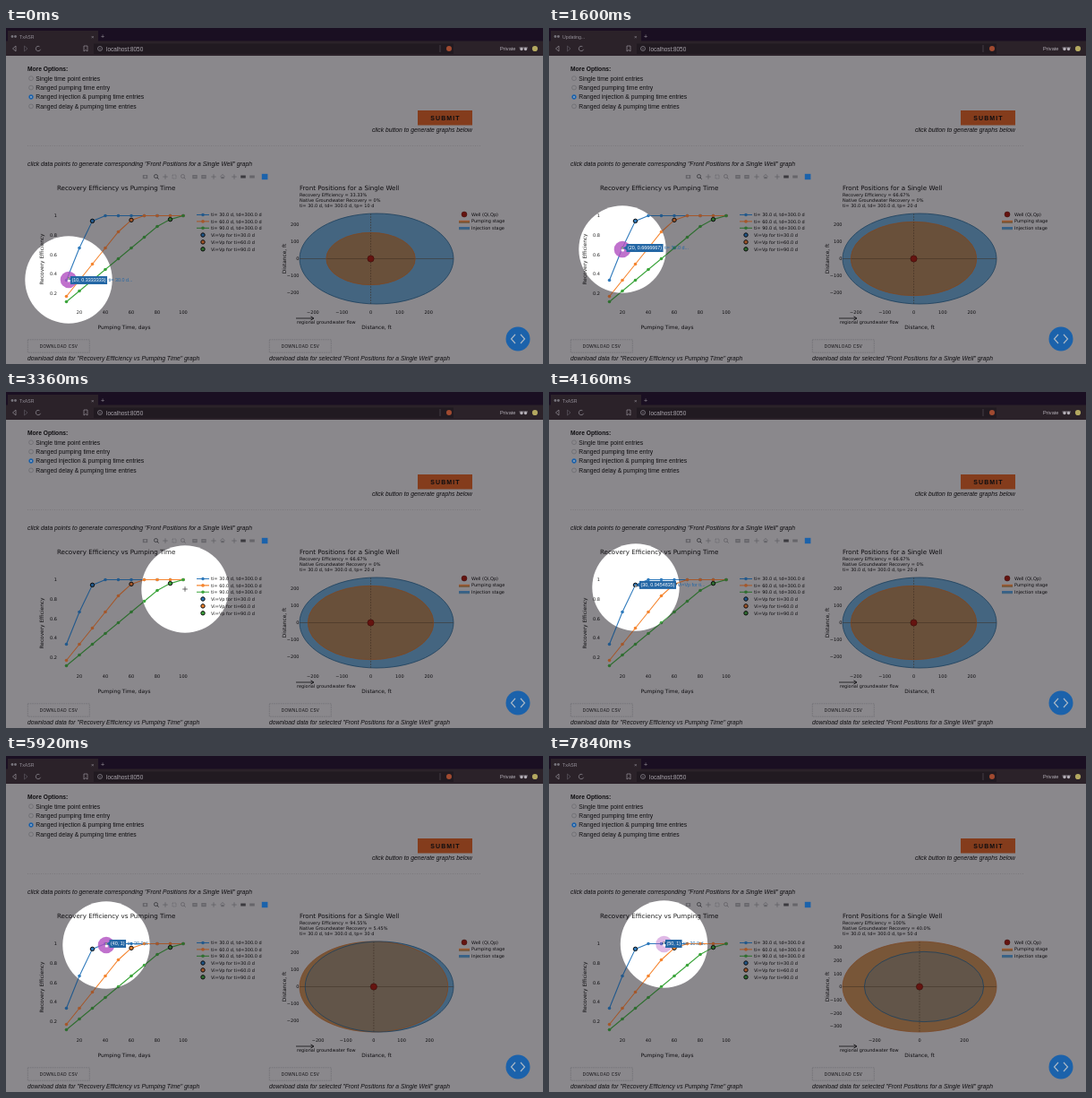
Animation, 600 px wide and 375 px high, one loop 8 s. Source, as an HTML page with a canvas:

```html
<!DOCTYPE html>
<html lang="en">
<head>
<meta charset="utf-8">
<title>Recovery dashboard</title>
<style>
  html, body { margin: 0; width: 100%; height: 100%; overflow: hidden; background: #8a888c; }
  canvas { display: block; width: 600px; height: 375px; }
</style>
</head>
<body>
<canvas id="stage"></canvas>
<script>
const canvas = document.getElementById('stage');
const ctx = canvas.getContext('2d');
const ratio = window.devicePixelRatio || 1;
canvas.width = 600 * ratio;
canvas.height = 375 * ratio;

const LOOP = 8000, STEP = 160, SPOT_RADIUS = 48.7, SPOT_LAG = 22;
const SANS = '"Liberation Sans", Arial, sans-serif';
const PLOT = '"DejaVu Sans", Verdana, sans-serif';

const dimTheme = {
  page: '#8a888c', ink: '#0e0d10', faint: '#747276', icon: '#66656a', iconOn: '#3c3b40',
  series: ['#22598c', '#a4572a', '#2f6e30'], accent: '#1b62ab',
  inject: '#446580', pump: '#785638', mix: '#69503a', mixLate: '#625549',
  injectLine: '#1c3f5c', pumpLine: '#7c4826', well: '#651410', button: '#843c1c', zero: '#3a2c20'
};
const litTheme = {
  page: '#fff', ink: '#222', faint: '#ccc', icon: '#bbb', iconOn: '#777',
  series: ['#2f7abc', '#f5852f', '#3ca53c'], accent: '#2b83d8',
  inject: '#72b3df', pump: '#fbb47b', mix: '#f3ab6c', mixLate: '#c9ae95',
  injectLine: '#2879b0', pumpLine: '#f5852f', well: '#b32014', button: '#d95a20', zero: '#666'
};

// Cursor stops: time, x, y
const stops = [
  [0, 70, 281], [480, 70, 281], [1120, 82, 247], [1840, 82, 247], [2620, 395, 207],
  [2720, 395, 207], [3240, 200, 220], [3520, 200, 220], [4080, 97, 218], [4960, 97, 218],
  [5440, 112, 211], [6560, 112, 211], [7120, 128.5, 210], [8000, 128.5, 210]
];
// Click begin, end and the moment the right graph follows
const clicks = [
  { from: -400, to: 320, update: -240, days: 10 },
  { from: 1280, to: 1840, update: 1440, days: 20 },
  { from: 4320, to: 4880, update: 4480, days: 30 },
  { from: 5760, to: 6320, update: 6080, days: 40 },
  { from: 7360, to: 7920, update: 7520, days: 50 }
];

const efficiency = (days, inject) =>
  days === inject ? [0.9455, 0.955, 0.962][inject / 30 - 1] : Math.min(1, days / inject);
const chartX = days => 53 + 1.45 * days;
const chartY = value => 317.5 - 108 * value;
const dayList = Array.from({ length: 10 }, (_, i) => 10 * (i + 1));

function text(str, x, y, size, color, { font = SANS, style = '', align = 'left', spacing = 0 } = {}) {
  ctx.font = `${style} ${size}px ${font}`;
  ctx.textAlign = align;
  ctx.letterSpacing = spacing + 'px';
  ctx.fillStyle = color;
  ctx.fillText(str, x, y);
}
const plotText = (str, x, y, size, color, align) => text(str, x, y, size, color, { font: PLOT, align });

function line(points, color, width = 1, dash = []) {
  ctx.beginPath();
  points.forEach(([x, y]) => ctx.lineTo(x, y));
  ctx.strokeStyle = color;
  ctx.lineWidth = width;
  ctx.setLineDash(dash);
  ctx.stroke();
  ctx.setLineDash([]);
}

function ellipse(x, y, rx, ry, fill, stroke, width = 1) {
  ctx.beginPath();
  ctx.ellipse(x, y, rx, ry, 0, 0, 7);
  if (fill) { ctx.fillStyle = fill; ctx.fill(); }
  if (stroke) { ctx.strokeStyle = stroke; ctx.lineWidth = width; ctx.stroke(); }
}
const dot = (x, y, r, fill, stroke, width) => ellipse(x, y, r, r, fill, stroke, width);

function rect(x, y, w, h, color) {
  ctx.fillStyle = color;
  ctx.fillRect(x, y, w, h);
}

function sideText(str, x, y, color) {
  ctx.save();
  ctx.translate(x, y);
  ctx.rotate(-Math.PI / 2);
  plotText(str, 0, 0, 5.83, color, 'center');
  ctx.restore();
}

function cursorAt(time) {
  const t = Math.max(0, time);
  const i = Math.max(1, stops.findIndex(s => s[0] >= t));
  const [t0, x0, y0] = stops[i - 1], [t1, x1, y1] = stops[i];
  const u = (t - t0) / (t1 - t0), ease = u * u * (3 - 2 * u);
  return { x: x0 + (x1 - x0) * ease, y: y0 + (y1 - y0) * ease };
}

function drawBrowser(updating) {
  const pale = '#96919a';
  rect(0, 0, 600, 31, '#2b2229');
  rect(0, 0, 600, 14.5, '#1a0f22');
  rect(2, 3, 101, 12, '#2b2229');
  dot(7, 9.5, 1.4, '#77747c');
  dot(10.5, 9.5, 1.4, '#77747c');
  text(updating ? 'Updating...' : 'TxASR', 15, 11.5, 5.2, pale);
  text('×', 95, 11.5, 6, pale);
  text('+', 106, 12, 7, pale);
  rect(98, 17.5, 402, 11.5, '#211a21');
  line([[11, 20], [7.5, 23], [11, 26], [11, 20]], pale, 0.7);
  line([[20.5, 20], [24, 23], [20.5, 26], [20.5, 20]], '#5c5661', 0.7);
  ctx.beginPath();
  ctx.arc(36, 23, 2.7, 0.3, 5.3);
  ctx.strokeStyle = pale;
  ctx.stroke();
  line([[87, 20], [91, 20], [91, 26], [89, 24.5], [87, 26], [87, 20]], pale, 0.7);
  dot(105, 23, 2.5, null, pale, 0.7);
  line([[105, 22.5], [105, 24.3]], pale, 0.7);
  text('localhost:8050', 112, 25.5, 6.4, '#aaa5ad');
  line([[485, 19], [485, 27]], '#5c5661', 0.6);
  dot(495, 23, 3, '#a04a30');
  text('Private', 552, 25.2, 5.6, '#b5b0b8');
  dot(576, 23.5, 1.7, '#b5b0b8');
  dot(580.5, 23.5, 1.7, '#b5b0b8');
  line([[573.5, 22], [583, 22]], '#b5b0b8', 0.7);
  dot(591, 23, 3.1, '#b3a860');
}

function drawForm(c) {
  const italic = { style: 'italic' };
  text('More Options:', 24, 48.3, 6.67, c.ink, { style: 'bold' });
  ['Single time point entries', 'Ranged pumping time entry',
    'Ranged injection & pumping time entries', 'Ranged delay & pumping time entries'
  ].forEach((label, i) => {
    const y = 56.2 + 10.4 * i, on = i === 2;
    dot(28, y, 2.4, on ? c.accent : c.page, on ? c.accent : c.icon, 0.6);
    if (on) dot(28, y, 0.9, '#aab4c0');
    text(label, 33.3, y + 2.4, 6.74, c.ink);
  });
  rect(460, 92, 61, 16.5, c.button);
  text('SUBMIT', 491, 103, 7, c.ink, { style: 'bold', align: 'center', spacing: 1.1 });
  text('click button to generate graphs below', 521, 116, 6.78, c.ink, { ...italic, align: 'right' });
  line([[24, 131.5], [530, 131.5]], c.faint, 0.7, [1, 1.5]);
  text('click data points to generate corresponding "Front Positions for a Single Well" graph',
    24, 154, 6.78, c.ink, italic);
  [[24, 'download data for "Recovery Efficiency vs Pumping Time" graph'],
    [294, 'download data for selected "Front Positions for a Single Well" graph']
  ].forEach(([x, label]) => {
    ctx.setLineDash([1.5, 1]);
    ctx.strokeStyle = c.icon;
    ctx.lineWidth = 0.6;
    ctx.strokeRect(x + 0.3, 347.8, 69, 14.4);
    ctx.setLineDash([]);
    text('DOWNLOAD CSV', x + 35, 357, 4.58, c.ink, { align: 'center', spacing: 0.42 });
    text(label, x, 370.5, 6.74, c.ink, italic);
  });
  dot(572, 347, 13.5, c.accent);
  line([[569, 342], [564.5, 347], [569, 352]], '#a9b8c6', 1.2);
  line([[575, 342], [579.5, 347], [575, 352]], '#a9b8c6', 1.2);
}

function drawToolbar(left, c) {
  const y = 166;
  [3.5, 16, 26, 36, 46, 59, 69, 80, 90, 103, 113, 123].forEach((dx, i) => {
    const x = left + dx, color = i === 1 || i === 10 ? c.iconOn : c.icon;
    if (i === 0 || i === 5 || i === 6) {
      rect(x - 2.7, y - 2, 5.4, 4.2, color);
      if (i) line([[x - 1.5, y], [x + 1.5, y]], c.page, 0.8);
      else dot(x, y, 1.2, c.page);
    } else if (i === 1 || i === 4) {
      dot(x - 0.5, y - 0.5, 2, null, color, 0.9);
      line([[x + 0.8, y + 0.8], [x + 2.7, y + 2.7]], color, 1);
    } else if (i === 2 || i === 7 || i === 9) {
      line([[x - 2.7, y], [x + 2.7, y]], color, 0.9);
      line([[x, y - 2.7], [x, y + 2.7]], color, 0.9);
    } else if (i === 3) {
      line([[x - 2, y - 2], [x + 2, y - 2], [x + 2, y + 2], [x - 2, y + 2], [x - 2, y - 2]], color, 0.8, [1, 0.7]);
    } else if (i === 8) {
      line([[x - 2.7, y], [x, y - 2.5], [x + 2.7, y]], color, 0.9);
      rect(x - 1.7, y, 3.4, 2.2, color);
    } else {
      rect(x - 2.8, y - 1.5, 5.6, 3, color);
    }
  });
  rect(left + 133.8, y - 3.2, 6.6, 6.4, c.accent);
}

function drawRecovery(c) {
  plotText('Recovery Efficiency vs Pumping Time', 57, 180.5, 7.1, c.ink);
  [20, 40, 60, 80, 100].forEach(d => plotText(d, chartX(d), 319.3, 5, c.ink, 'center'));
  [0.2, 0.4, 0.6, 0.8, 1].forEach(v => plotText(v, 57, chartY(v) + 1.8, 5, c.ink, 'right'));
  plotText('Pumping Time, days', 132, 335.5, 5.83, c.ink, 'center');
  sideText('Recovery Efficiency', 41.5, 258, c.ink);
  const injections = [30, 60, 90];
  injections.forEach((ti, i) => {
    const color = c.series[i], y = 208.5 + 7.4 * i;
    const points = dayList.map(d => [chartX(d), chartY(efficiency(d, ti))]);
    line(points, color, 1.1);
    points.forEach(([px, py]) => dot(px, py, 1.8, color));
    line([[213, y], [227, y]], color, 1.1);
    dot(220, y, 1.8, color);
    plotText(`ti= ${ti}.0 d, td=300.0 d`, 229, y + 1.8, 5, c.ink);
  });
  injections.forEach((ti, i) => {
    const y = 231 + 7.9 * i;
    dot(chartX(ti), chartY(efficiency(ti, ti)), 2.2, c.series[i], '#0c0c0c', 1);
    dot(220, y, 2.2, c.series[i], '#0c0c0c', 1);
    plotText(`Vi=Vp for ti=${ti}.0 d`, 229, y + 1.8, 5, c.ink);
  });
}

function drawFronts(days, c) {
  const injectR = 266, drift = 20, pumpR = injectR * Math.sqrt(days / 30);
  const low = Math.min(drift - injectR, -pumpR), high = Math.max(drift + injectR, pumpR);
  const sx = 172 / (high - low), sy = 50.5 / Math.max(injectR, pumpR);
  const wellX = 328 - low * sx, wellY = 257.5;
  const inject = [wellX + drift * sx, wellY, injectR * sx, injectR * sy];
  const pump = [wellX, wellY, pumpR * sx, pumpR * sy];

  plotText('Front Positions for a Single Well', 328, 180.5, 7.1, c.ink);
  const gain = days >= 40 ? '100' : (efficiency(days, 30) * 100).toFixed(2);
  const native = { 30: '5.45', 40: '25.0', 50: '40.0' }[days] || '0';
  [`Recovery Efficiency = ${gain}%`, `Native Groundwater Recovery = ${native}%`,
    `ti= 30.0 d, td= 300.0 d, tp= ${days} d`
  ].forEach((row, i) => plotText(row, 328, 187.8 + 6.2 * i, 5, c.ink));

  ellipse(...inject, c.inject);
  ellipse(...pump, c.pump);
  ctx.save();
  ctx.beginPath();
  ctx.ellipse(...inject, 0, 0, 7);
  ctx.clip();
  ellipse(...pump, days < 30 ? c.mix : c.mixLate);
  ctx.restore();
  line([[328, wellY], [500, wellY]], c.zero, 0.5);
  line([[wellX, 207], [wellX, 308]], c.zero, 0.5, [2, 1]);
  ellipse(...pump, null, c.pumpLine, 0.8);
  ellipse(...inject, null, c.injectLine, 0.8);
  dot(wellX, wellY, 3.6, c.well, '#3a0c0a', 0.6);

  const label = v => String(v).replace('-', '−');
  const xStep = days > 30 ? 200 : 100;
  for (let v = -200; v <= 200; v += xStep) plotText(label(v), wellX + v * sx, 319.3, 5, c.ink, 'center');
  const yMax = Math.floor(Math.max(injectR, pumpR) / 100) * 100;
  for (let v = -yMax; v <= yMax; v += 100) plotText(label(v), 327.5, wellY - v * sy + 1.8, 5, c.ink, 'right');

  plotText('Distance, ft', 414, 335.5, 5.83, c.ink, 'center');
  sideText('Distance, ft', 312.5, 257.5, c.ink);
  line([[324, 324], [343, 324]], c.ink, 0.8);
  line([[340.5, 322], [344, 324], [340.5, 326]], c.ink, 0.9);
  plotText('regional groundwater flow', 325, 330, 5, c.ink);

  dot(512, 208, 3, c.well, '#3a0c0a', 0.5);
  [[c.pump, c.series[1]], [c.inject, c.series[0]]].forEach(([fill, edge], i) => {
    const y = 215.4 + 7.4 * i;
    rect(506, y, 12, 2.4, fill);
    line([[506, y], [518, y]], edge, 1.1);
  });
  ['Well (Qi,Qp)', 'Pumping stage', 'Injection stage'].forEach((name, i) =>
    plotText(name, 520, 209.9 + 7.4 * i, 5, c.ink));
}

function drawPage(c, state) {
  rect(0, 0, 600, 375, c.page);
  drawForm(c);
  drawToolbar(152, c);
  if (state.cursor.x > 318) {
    ctx.globalAlpha = 0.5;
    drawToolbar(434, c);
    ctx.globalAlpha = 1;
  }
  drawRecovery(c);
  drawFronts(state.days, c);
  drawBrowser(state.updating);
}

function drawHover(days) {
  const x = chartX(days), value = efficiency(days, 30), y = chartY(value);
  const number = days === 30 ? '0.9454835' : value < 1 ? value.toFixed(7) : '1';
  const label = `(${days}, ${number})`, blue = '#2467a5';
  ctx.font = `5.4px ${SANS}`;
  ctx.letterSpacing = '0px';
  const width = ctx.measureText(label).width + 3;
  rect(x + 4.5, y - 4.5, width, 9, blue);
  ctx.beginPath();
  ctx.moveTo(x + 1, y);
  ctx.lineTo(x + 5, y - 2.5);
  ctx.lineTo(x + 5, y + 2.5);
  ctx.fill();
  text(label, x + 6, y + 1.9, 5.4, '#fff');
  text(days === 30 ? 'Vi=Vp for ti...' : 'ti= 30.0 d...', x + width + 6, y + 1.9, 5.4, blue);
}

function drawCursor({ x, y }, onPoint) {
  if (onPoint) {
    line([[x, y - 3], [x, y + 2]], '#333', 1.8);
    line([[x, y - 2.7], [x, y + 1.7]], '#fff', 1);
    rect(x - 1.2, y, 3, 2.4, '#fff');
  } else {
    line([[x - 2.8, y], [x + 2.8, y]], '#333', 0.7);
    line([[x, y - 2.8], [x, y + 2.8]], '#333', 0.7);
  }
}

function draw(t) {
  const cursor = cursorAt(t), spot = cursorAt(t - SPOT_LAG);
  const latest = clicks.filter(k => t >= k.update).pop();
  const updating = clicks.some(k => t >= k.update && t < k.update + 240);
  const state = { cursor, days: latest.days, updating };
  const hovered = dayList.find(d =>
    Math.hypot(chartX(d) - cursor.x, chartY(efficiency(d, 30)) - cursor.y) < 6);

  ctx.setTransform(ratio, 0, 0, ratio, 0, 0);
  drawPage(dimTheme, state);
  ctx.save();
  ctx.beginPath();
  ctx.arc(spot.x, spot.y, SPOT_RADIUS, 0, 7);
  ctx.clip();
  drawPage(litTheme, state);
  ctx.restore();

  const press = clicks.find(k => t >= k.from && t < k.to);
  if (press) {
    ctx.globalAlpha = Math.min(0.8, (press.to - t) / 200);
    dot(cursor.x, cursor.y, 9.3, '#b04fc0');
    ctx.globalAlpha = 1;
  }
  if (hovered) drawHover(hovered);
  drawCursor(cursor, hovered);
}

function tick() {
  const t = performance.now() % LOOP;
  draw(Math.floor(t / STEP) * STEP);
  requestAnimationFrame(tick);
}
tick();
</script>
</body>
</html>
```
